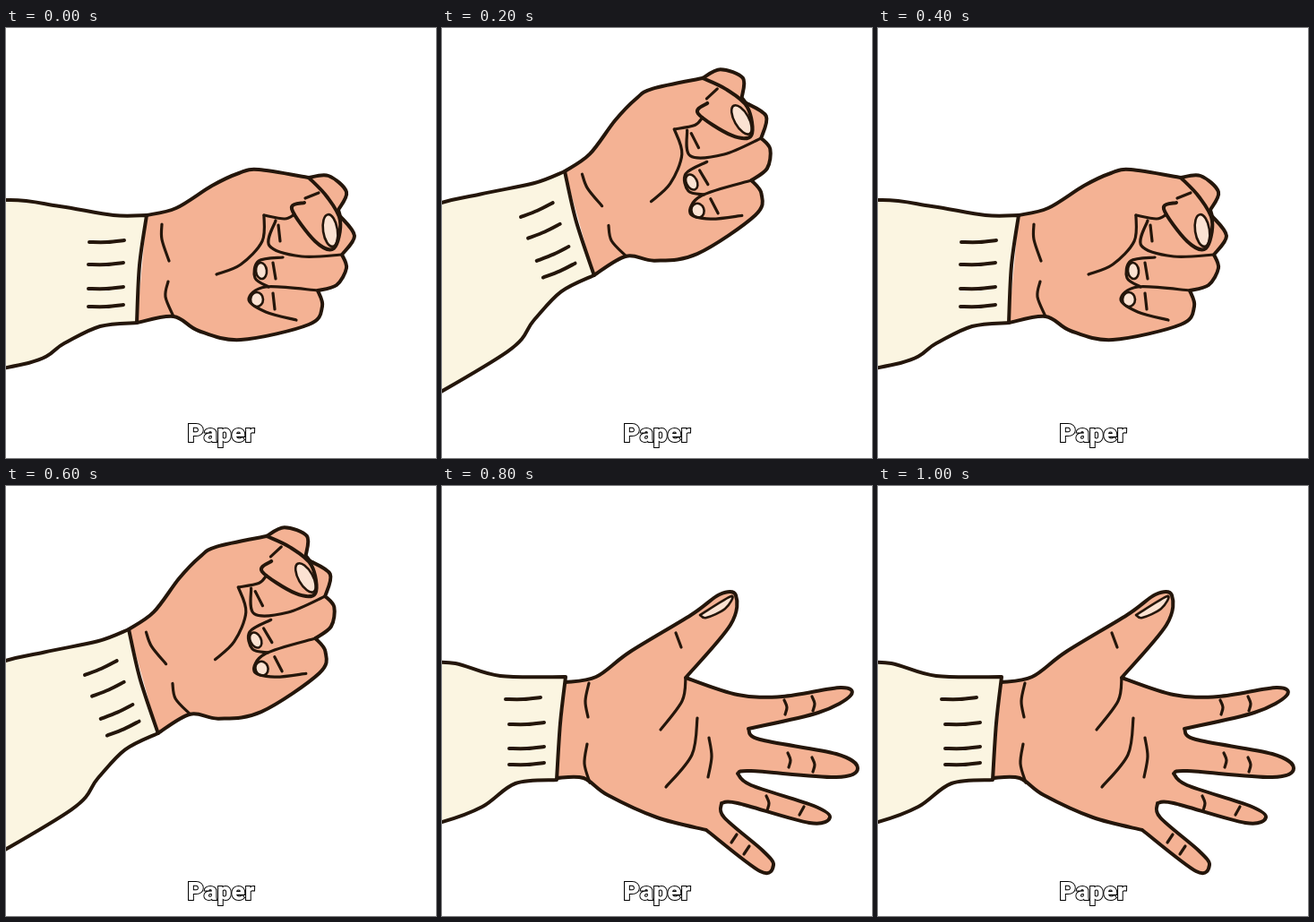
Animation, 480 px wide and 480 px high, one loop 1200 ms. Source, as an HTML page with a canvas:

```html
<!DOCTYPE html>
<html lang="en">
<head>
<meta charset="utf-8">
<title>Paper</title>
<style>
  html, body { margin: 0; width: 100%; height: 100%; overflow: hidden; background: #fff; }
  canvas { display: block; width: 100vmin; height: 100vmin; }
</style>
</head>
<body>
<canvas id="stage" width="480" height="480"></canvas>
<script>
const ctx = document.getElementById('stage').getContext('2d');
const INK = '#24160b', SKIN = '#f4b294', NAIL = '#fbe2d2', WOOL = '#fbf5e1';
const STEP = 200;

// Smooth curve through x, y pairs, added to the current path.
function trace(p) {
  const last = p.length / 2 - 1;
  const at = (i, k) => p[2 * Math.max(0, Math.min(last, i)) + k];
  const lead = (i, k) => (at(i + 1, k) - at(i - 1, k)) / 6;
  ctx.lineTo(p[0], p[1]);
  for (let i = 0; i < last; i++) {
    const j = i + 1;
    ctx.bezierCurveTo(
      at(i, 0) + lead(i, 0), at(i, 1) + lead(i, 1),
      at(j, 0) - lead(j, 0), at(j, 1) - lead(j, 1),
      at(j, 0), at(j, 1));
  }
}

function paint(color, width) {
  ctx.lineWidth = width;
  if (color) {
    ctx.fillStyle = color;
    ctx.fill();
  }
  ctx.stroke();
}

function shape(color, width, ...edges) {
  ctx.beginPath();
  edges.forEach(trace);
  paint(color, width);
}

const line = (...p) => shape(null, 3.2, p);

function nail(x, y, rx, ry, tilt) {
  ctx.beginPath();
  ctx.ellipse(x, y, rx, ry, tilt, 0, 2 * Math.PI);
  paint(NAIL, 2.6);
}

const joint = (x, y) => line(x - 1, y - 8, x + 2, y, x, y + 8);
const rib = (x, y) => shape(null, 4, [x, y, x + 20, y, x + 39, y - 2]);

function drawFist() {
  shape(SKIN, 4,
    [157,209, 190,201, 230,176, 260,162, 282,158, 338,167],
    [338,167, 360,165, 380,183, 371,203],
    [373,210, 389,232, 375,253],
    [375,253, 380,268, 369,287, 348,293],
    [348,293, 353,311, 338,331, 262,348, 215,338, 187,322, 146,329]);
  shape(WOOL, 4,
    [-90,205, 0,192, 60,199, 120,209, 157,209],
    [157,209, 149,265, 146,329],
    [146,329, 105,333, 65,352, 25,374, -110,397]);

  nail(362, 226, 8, 18, -0.15);
  nail(285, 271, 6, 9, -0.1);
  nail(280, 303, 7, 8, 0);

  shape(null, 4, [338,167, 358,188, 373,215, 366,246, 345,238, 319,202, 333,195]);
  line(334,190, 349,184);
  line(375,253, 330,255, 294,243, 301,215);
  line(288,209, 311,213, 322,208);
  line(288,209, 286,238, 262,264, 235,275);
  line(304,220, 306,238);
  line(309,256, 282,260, 278,279, 293,289);
  line(298,262, 301,280);
  line(348,293, 290,289, 271,303, 290,317, 324,326);
  line(298,296, 300,314);
  line(174,219, 174,236, 182,260);
  line(181,283, 178,300, 187,322);

  rib(93, 239);
  rib(92, 264);
  rib(92, 291);
  rib(92, 311);
}

function drawRaised() {
  // Swing the whole arm about the top of the cuff.
  ctx.translate(137, 160);
  ctx.rotate(-21 * Math.PI / 180);
  ctx.translate(-157, -209);
  drawFist();
}

function drawOpen() {
  shape(SKIN, 4,
    [138,219, 172,213, 210,185, 278,144, 310,121, 328,122, 322,155, 272,214],
    [272,214, 330,233, 380,235, 445,225, 456,234, 420,253, 342,271],
    [342,271, 355,283, 440,299, 464,315, 440,325, 345,318, 330,321],
    [330,321, 345,334, 415,357, 433,370, 410,376, 330,354, 312,354],
    [312,354, 315,370, 358,407, 370,423, 355,430, 295,384],
    [295,384, 240,370, 185,345, 158,326, 128,326]);
  shape(WOOL, 4,
    [-20,197, 15,198, 65,212, 138,213],
    [138,213, 132,265, 128,328],
    [128,328, 82,332, 45,358, 0,375, -20,376]);
  shape(NAIL, 2.6, [288,144, 323,123, 316,137, 295,147, 288,144]);

  line(272,214, 268,240, 244,272);
  line(261,164, 267,180);
  line(164,220, 160,240, 163,258);
  line(162,288, 159,310, 165,331);
  line(285,259, 279,300, 250,336);
  line(298,281, 301,302, 297,325);

  joint(383, 247);
  joint(414, 243);
  joint(387, 306);
  joint(414, 311);
  joint(363, 354);
  line(404,358, 399,367);
  line(329,389, 323,398);
  line(343,402, 337,411);

  rib(71, 238);
  rib(75, 266);
  rib(75, 293);
  rib(75, 311);
}

const fontAt = size => `900 condensed ${size}px Impact, Roboto, "Open Sans", sans-serif`;

function drawCaption() {
  ctx.font = fontAt(30);
  ctx.font = fontAt(Math.min(32, 30 * 75 / ctx.measureText('Paper').width));
  ctx.textAlign = 'center';
  ctx.lineWidth = 2;
  ctx.strokeStyle = '#000';
  ctx.strokeText('Paper', 240, 462);
  ctx.fillStyle = '#fff';
  ctx.fillText('Paper', 240, 462);
}

function draw(pose) {
  ctx.fillStyle = '#fff';
  ctx.fillRect(0, 0, 480, 480);
  ctx.save();
  ctx.lineCap = ctx.lineJoin = 'round';
  ctx.strokeStyle = INK;
  pose();
  ctx.restore();
  drawCaption();
}

const poses = [drawFist, drawRaised, drawFist, drawRaised, drawOpen, drawOpen];
const start = performance.now();

function tick() {
  const t = Math.max(0, performance.now() - start);
  draw(poses[Math.floor(t / STEP) % poses.length]);
  requestAnimationFrame(tick);
}
tick();
</script>
</body>
</html>
```
